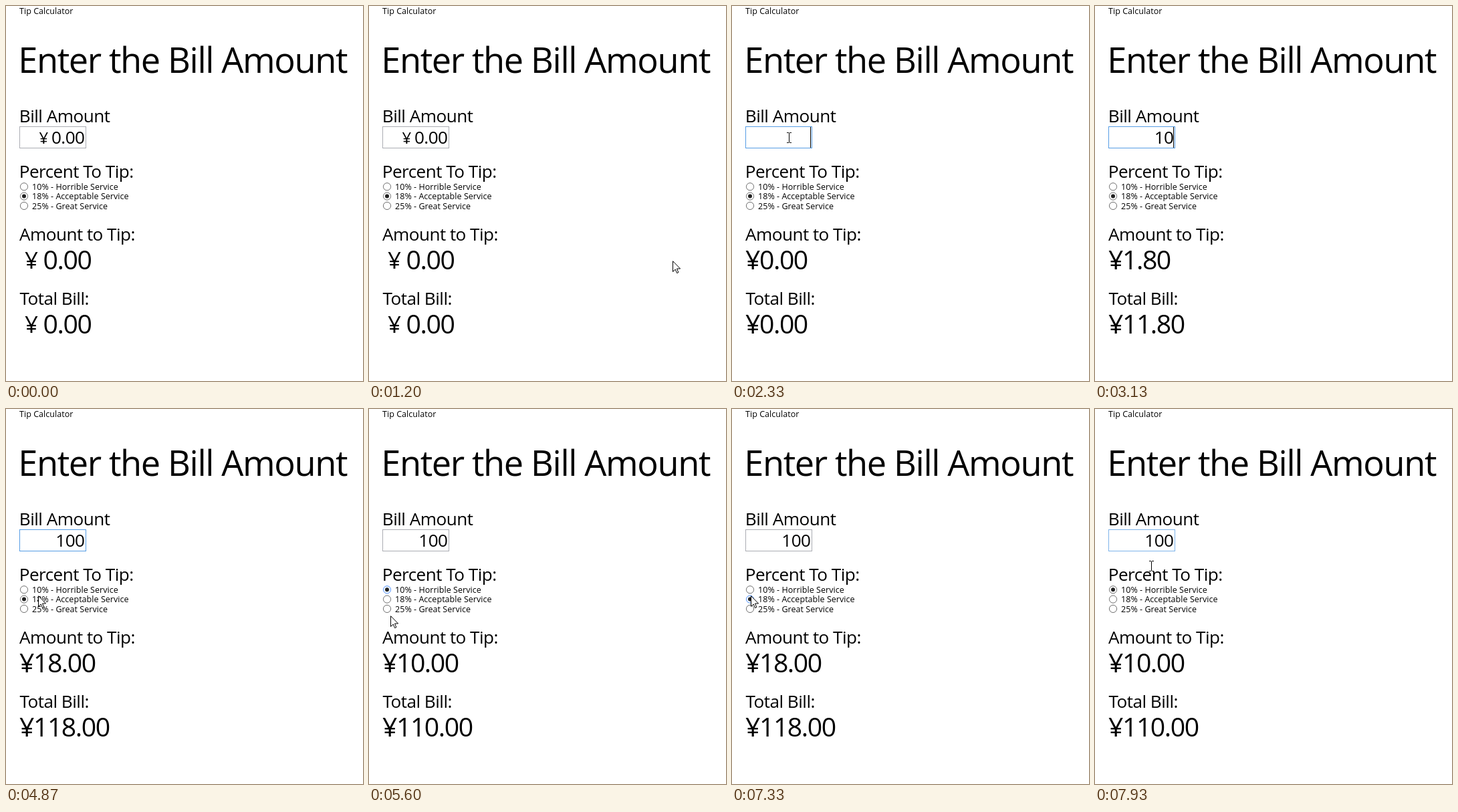
An HTML page that plays this animation: 534 by 561 pixels, repeating every 8 s.

```html
<!DOCTYPE html>
<html lang="en">
<head>
<meta charset="utf-8">
<title>Tip Calculator</title>
<style>
  html, body { margin: 0; width: 100%; height: 100%; overflow: hidden; background: #fff; }
  svg { display: block; width: 100%; height: 100%; }
  text { font-family: "Open Sans", "Noto Sans", sans-serif; fill: #000; }
  .small { font-size: 12.5px; letter-spacing: .004em; }
  .title { font-size: 52.3px; letter-spacing: -.026em; }
  .mid { font-size: 26.1px; letter-spacing: -.02em; }
  .big { font-size: 39.2px; letter-spacing: -.037em; }
</style>
</head>
<body>
<svg viewBox="0 0 534 561">
  <text class="small" x="20" y="12">Tip Calculator</text>
  <text class="title" x="18.2" y="100">Enter the Bill Amount</text>
  <text class="mid" x="19.8" y="174">Bill Amount</text>
  <rect id="box" x="20.5" y="180.5" width="99" height="32" fill="#fff"/>
  <text class="mid" id="bill" x="117.5" y="206" text-anchor="end"></text>
  <rect id="caret" x="117" y="181" width="1" height="31"/>
  <text class="mid" x="19.8" y="257">Percent To Tip:</text>
  <g id="radios"></g>
  <text class="mid" x="20" y="351">Amount to Tip:</text>
  <text class="big" id="tip" y="393.5"></text>
  <text class="mid" x="20.5" y="447">Total Bill:</text>
  <text class="big" id="total" y="489.5"></text>
  <g id="wideYen">
    <text x="49.5" y="206" font-size="24">¥</text>
    <text x="28" y="393" font-size="35">¥</text>
    <text x="28" y="489" font-size="35">¥</text>
  </g>
  <path id="arrow" fill="#fff" stroke="#000" d="M.5.7V16.5L4.2 13 6.6 18.6 8.9 17.6 6.5 12H11.6Z"/>
  <path id="beam" fill="none" stroke="#000" d="M-3-7.5H0M1-7.5H4M.5-7V7M-3 7.5H0M1 7.5H4"/>
</svg>
<script>
const LOOP = 8000, FPS = 15, ROW = 14.3;
const $ = id => document.getElementById(id);

// All times are ticks of 1/15 s
const path = [
  [17, 481, 404], [24, 294, 240], [27, 291, 238], [33, 85, 197], [72, 85, 197],
  [73, 48, 279], [75, 24, 301], [80, 27, 268], [82, 27, 268], [84, 32, 309],
  [85, 33, 332], [90, 29, 329], [93, 24, 268], [95, 25, 299], [96, 30, 284],
  [98, 38, 314], [101, 38, 314], [104, 28, 284], [109, 28, 284], [112, 27, 268],
  [117, 84, 200], [119, 84, 235]
];
const clicks = [35, 82, 95, 106, 112];
const keys = [45, 47, 49];
const BLINK = 7.65, HOVER_LAG = 2;

const options = [[10, 'Horrible'], [18, 'Acceptable'], [25, 'Great']];
$('radios').innerHTML = options.map(([rate, name], i) => {
  const y = 270.3 + ROW * i;
  return `<circle class="ring" cx="27" cy="${y}" r="5.6"/>
    <circle class="dot" cx="27" cy="${y}" r="3" fill="#212121"/>
    <text class="small" x="39" y="${y + 4.6}">${rate}% - ${name} Service</text>`;
}).join('');
const rings = document.querySelectorAll('.ring');
const dots = document.querySelectorAll('.dot');

const show = (el, on) => el.setAttribute('visibility', on ? 'visible' : 'hidden');

function position(k) {
  const i = path.findIndex(p => p[0] >= k);
  if (i < 1) return path[0].slice(1);
  const [t0, x0, y0] = path[i - 1], [t1, x1, y1] = path[i];
  const f = (k - t0) / (t1 - t0);
  return [Math.round(x0 + (x1 - x0) * f), Math.round(y0 + (y1 - y0) * f)];
}

// The pointer hides from the first key press until it moves again
const pointerShown = k => k >= 17 && (k < keys[0] || k >= 73);

// Control under the pointer: 'box', a radio row number, or undefined
function under(k) {
  if (!pointerShown(k)) return;
  const [x, y] = position(k);
  if (x > 20 && x < 120 && y > 180 && y < 213) return 'box';
  const row = Math.floor((y - 263) / ROW);
  if (options[row]) return row;
}

function setMoney(id, value, wide) {
  $(id).setAttribute('x', wide ? 55.5 : 20);
  $(id).textContent = (wide ? '' : '¥') + value.toFixed(2);
}

function draw(ms) {
  const k = Math.floor((ms + 5) * FPS / 1000) % (LOOP * FPS / 1000);
  const hits = clicks.filter(c => c <= k).map(under);
  const untouched = !hits.length;
  const focused = hits.at(-1) === 'box';
  const picked = hits.findLast(hit => hit !== 'box') ?? 1;
  const hot = under(k - HOVER_LAG);

  const typed = '100'.slice(0, keys.filter(t => t <= k).length);
  const tip = typed * options[picked][0] / 100;
  $('bill').textContent = untouched ? '0.00' : typed;
  setMoney('tip', tip, untouched);
  setMoney('total', +typed + tip, untouched);
  show($('wideYen'), untouched);

  const blinkStart = k > keys[0] ? keys[0] + .5 : clicks[0];
  show($('caret'), focused && Math.floor((k - blinkStart) / BLINK) % 2 === 0);
  $('box').setAttribute('stroke', focused ? '#569de5' : hot === 'box' ? '#7eb4ea' : '#abadb3');

  rings.forEach((ring, i) => {
    ring.setAttribute('stroke', i === hot ? '#5593ff' : '#707070');
    ring.setAttribute('fill', i === hot ? '#f3f9ff' : '#fff');
    show(dots[i], i === picked);
  });

  const kind = hot === 'box' ? 'beam' : 'arrow';
  for (const id of ['arrow', 'beam']) {
    show($(id), pointerShown(k) && id === kind);
    $(id).setAttribute('transform', `translate(${position(k)})`);
  }
}

const start = performance.now();
function loop() {
  draw((performance.now() - start) % LOOP);
  requestAnimationFrame(loop);
}
loop();
</script>
</body>
</html>
```
